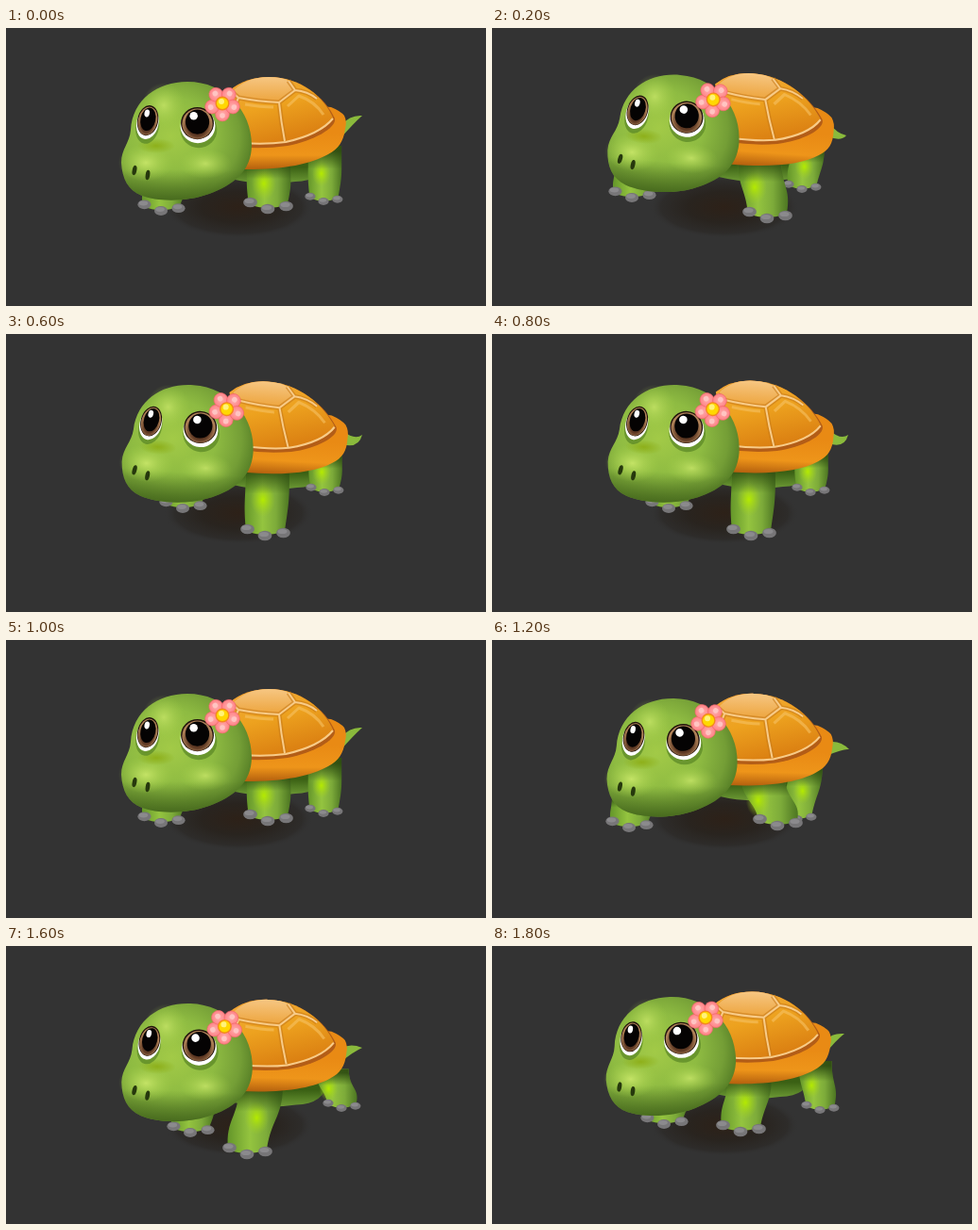
An HTML page that plays this animation: 508 px wide and 295 px high, repeating every 2000 ms.

```html
<!DOCTYPE html>
<html lang="en">
<head>
<meta charset="utf-8">
<title>Walking turtle</title>
<style>
html, body { margin: 0; height: 100%; overflow: hidden; background: #333; }
svg { display: block; width: 100vw; height: 100vh; }
</style>
</head>
<body>
<svg viewBox="0 0 508 295">
  <defs>
    <radialGradient id="ground">
      <stop offset="0" stop-color="#2d2118"/>
      <stop offset=".5" stop-color="#29241f"/>
      <stop offset=".85" stop-color="#2d2b29" stop-opacity=".9"/>
      <stop offset="1" stop-color="#333" stop-opacity="0"/>
    </radialGradient>
    <radialGradient id="skin" cx=".38" cy=".46" r=".66">
      <stop offset="0" stop-color="#a2ca47"/>
      <stop offset=".5" stop-color="#8ebb42"/>
      <stop offset=".8" stop-color="#749e36"/>
      <stop offset="1" stop-color="#527a24"/>
    </radialGradient>
    <radialGradient id="glow">
      <stop offset="0" stop-color="#cdea6c"/>
      <stop offset="1" stop-color="#a3cf48" stop-opacity="0"/>
    </radialGradient>
    <radialGradient id="spot">
      <stop offset="0" stop-color="#b4ea00"/>
      <stop offset="1" stop-color="#a0d020" stop-opacity="0"/>
    </radialGradient>
    <radialGradient id="olive">
      <stop offset="0" stop-color="#8eb01a"/>
      <stop offset="1" stop-color="#8eb01a" stop-opacity="0"/>
    </radialGradient>
    <linearGradient id="chin" x2="0" y2="1">
      <stop offset=".74" stop-color="#41631a" stop-opacity="0"/>
      <stop offset="1" stop-color="#41631a" stop-opacity=".85"/>
    </linearGradient>
    <linearGradient id="limb">
      <stop offset="0" stop-color="#64962a"/>
      <stop offset=".4" stop-color="#94c43f"/>
      <stop offset=".7" stop-color="#7dab3a"/>
      <stop offset="1" stop-color="#4c7522"/>
    </linearGradient>
    <linearGradient id="shade" x2="0" y2="1">
      <stop offset=".1" stop-color="#2c4a10" stop-opacity=".9"/>
      <stop offset=".42" stop-color="#2c4a10" stop-opacity="0"/>
    </linearGradient>
    <linearGradient id="belly" x2="0" y2="1">
      <stop offset=".3" stop-color="#3a6014"/>
      <stop offset="1" stop-color="#6d9a35"/>
    </linearGradient>
    <linearGradient id="dome" x2=".4" y2="1">
      <stop offset="0" stop-color="#f0a93f"/>
      <stop offset=".5" stop-color="#eda21f"/>
      <stop offset="1" stop-color="#db8012"/>
    </linearGradient>
    <linearGradient id="cap" x2="0" y2="1">
      <stop offset="0" stop-color="#f6c682"/>
      <stop offset="1" stop-color="#eda43c"/>
    </linearGradient>
    <linearGradient id="rim" x2="0" y2="1">
      <stop offset=".5" stop-color="#e98a14"/>
      <stop offset=".8" stop-color="#ee951a"/>
      <stop offset="1" stop-color="#b4600e"/>
    </linearGradient>
    <radialGradient id="iris" cy=".6">
      <stop offset=".6" stop-color="#5d3823"/>
      <stop offset="1" stop-color="#b08258"/>
    </radialGradient>
    <radialGradient id="petal">
      <stop offset=".2" stop-color="#ffa6a6"/>
      <stop offset="1" stop-color="#ff8287"/>
    </radialGradient>

    <g id="shell">
      <path fill="url(#rim)" d="M240 74L344 84Q354 88 358 93Q361 99 359 107C357 121 352 128 341 134C322 145 290 151 245 150Z"/>
      <path fill="#b35d17" d="M237 66Q254 52 278 52C312 52 338 74 348 96C350 106 325 120 298 125Q270 129 245 126Z"/>
      <path fill="url(#dome)" d="M237 66Q254 52 278 52C312 52 336 73 346 95C346 103 322 116 296 121Q270 125 245 122Z"/>
      <path fill="url(#cap)" d="M240 67Q255 52 278 52Q292 52 299 56L306 66L289 79Q262 78 246 74Z"/>
      <g fill="none" stroke-linejoin="round">
        <g id="seams" stroke="#c97a18" stroke-width="5" stroke-opacity=".6">
          <path d="M239 68L246 74Q266 78 289 79L306 66L299 56M289 79Q291 99 295 120M306 66Q319 67 329 75M246 74L242 83"/>
        </g>
        <path stroke="#f8cb88" stroke-width="2" d="M239 68L246 74Q266 78 289 79L306 66L299 56M289 79Q291 99 295 120M306 66Q319 67 329 75M246 74L242 83M248 122Q275 124 296 121Q332 113 346 96"/>
        <path stroke="#f7c263" stroke-width="3" opacity=".6" d="M298 83L310 72Q327 78 336 92M253 81Q270 84 283 84"/>
      </g>
    </g>

    <g id="eye">
      <ellipse cx="1" cy="5" rx="20" ry="20" fill="#5f8d28" opacity=".8"/>
      <ellipse cy="1" rx="19" ry="18.8" fill="#fff"/>
      <ellipse cx="-.5" cy="-2" rx="18" ry="17.6" fill="#20120b"/>
      <ellipse cx="-.5" cy="-1.5" rx="16.6" ry="16.6" fill="url(#iris)"/>
      <ellipse cx="-.5" cy="-3.5" rx="13" ry="13.5" fill="#050303"/>
      <ellipse cx="-4.5" cy="-10" rx="4.4" ry="4.4" fill="#fff"/>
    </g>

    <g id="head">
      <path id="face" fill="url(#skin)" d="M122 143C122 128 131 122 132 108C134 76 160 57 192 57C232 57 260 88 260 124C260 152 240 167 215 176C190 185 160 184 144 178C129 172 123 160 122 143Z"/>
      <path fill="url(#chin)" d="M122 143C122 128 131 122 132 108C134 76 160 57 192 57C232 57 260 88 260 124C260 152 240 167 215 176C190 185 160 184 144 178C129 172 123 160 122 143Z"/>
      <ellipse cx="167" cy="82" rx="23" ry="24" fill="url(#glow)" opacity=".7"/>
      <ellipse cx="148" cy="143" rx="29" ry="20" fill="url(#glow)" opacity=".85"/>
      <ellipse cx="211" cy="144" rx="28" ry="16" fill="url(#glow)" opacity=".75"/>
      <ellipse cx="159" cy="125" rx="20" ry="8" fill="url(#olive)"/>
      <use href="#eye" transform="translate(150 100) rotate(12) scale(.61 .92)"/>
      <use href="#eye" transform="translate(203 103) scale(.97)"/>
      <g fill="#26380d">
        <ellipse cx="136" cy="151" rx="2.3" ry="5.2" transform="rotate(12 136 151)"/>
        <ellipse cx="150" cy="156" rx="2.3" ry="5.2" transform="rotate(8 150 156)"/>
      </g>
      <g id="flower" transform="translate(229 80)"></g>
    </g>
  </defs>
  <rect width="508" height="295" fill="#333"/>
  <ellipse cx="246" cy="190" rx="79" ry="33" fill="url(#ground)"/>
  <g id="turtle"></g>
</svg>
<script>
const byId = id => document.getElementById(id);

byId('flower').innerHTML = [0, 1, 2, 3, 4].map(i =>
  `<circle cy="11.5" r="7.4" fill="url(#petal)" stroke="#f4656c" stroke-width=".6" transform="rotate(${i * 72})"/>
   <circle cy="13" r="2.8" fill="#ffc4c2" transform="rotate(${i * 72})"/>`).join('') +
  '<circle r="6.8" fill="#ffd800" stroke="#f38a1c" stroke-width="1.4"/><circle cx="-1" cy="-2" r="3" fill="#fff27a"/>';

// head: dx, dy, degrees; shell: dx, dy, slant; feet: middle claw; tail: bend point, tip
const stand = { head: [0, 0, 0], shell: [0, 0, 0], front: [277, 192], hind: [336, 184], far: [164, 194], tail: [364, 92, 377, 93] };
const lift = { head: [2, -7.5, 4.8], shell: [2, -2, 4], front: [291, 202], hind: [328, 171], far: [148, 180], tail: [365, 112, 375, 114] };
const glide = { head: [2, -3, 3.8], shell: [2, 0, 3.5], front: [274, 214], hind: [337, 168], far: [187, 185], tail: [369, 113, 377, 107] };
const crouch = { head: [-.3, 5, .5], shell: [1, 5.5, 1.5], front: [302, 197], hind: [323, 190], far: [145, 199], tail: [368, 106, 378, 116] };
const reach = { head: [1, 4, 2], shell: [1, 5.5, 1.5], front: [255, 221], hind: [355, 172], far: [195, 198], tail: [364, 103, 377, 108] };
const rise = { head: [-2, -3, -1.6], shell: [-1, -3, 1], front: [263, 197], hind: [347, 174], far: [182, 189], tail: [359, 92, 373, 93] };

const poses = [
  stand, lift,
  { ...glide, head: [2, -5.3, 4.3], shell: [2, -1, 3.8], front: [282, 203], far: [168, 183] },
  glide, { ...glide, shell: [2, -1, 3] },
  stand, crouch,
  { ...reach, head: [.5, 4.3, 1.3], far: [170, 200] },
  reach, rise
];

function leg(hx, hy, [fx, fy], size, hasSpot) {
  const w = 23 * size, mid = (hy + fy) / 2, ankle = fy - 5 * size;
  const shape = `M${hx - w} ${hy}C${hx - w} ${mid} ${fx - w} ${mid} ${fx - w + 3} ${ankle}` +
    `Q${fx} ${fy + 3} ${fx + w - 2} ${ankle}C${fx + w + 3} ${mid} ${hx + w} ${mid} ${hx + w} ${hy}Z`;
  const claw = (dx, dy) => {
    const x = fx + dx * size, y = fy + dy * size;
    return `<ellipse cx="${x}" cy="${y}" rx="${7.4 * size}" ry="${5.2 * size}" fill="#777678"/>
      <ellipse cx="${x - size}" cy="${y - 1.5 * size}" rx="${5 * size}" ry="${2.6 * size}" fill="#8b8a8d"/>`;
  };
  return `<path d="${shape}" fill="url(#limb)"/>` +
    (hasSpot ? `<ellipse cx="${hx - 5 * size}" cy="${mid}" rx="${13 * size}" ry="${18 * size}" fill="url(#spot)"/>` : '') +
    `<path d="${shape}" fill="url(#shade)"/>` +
    claw(-18.5, -7) + claw(19.5, -3) + claw(0, 0);
}

function draw({ head, shell, front, hind, far, tail }) {
  const [sx, sy, slant] = shell, [hx, hy, turn] = head, [cx, cy, tx, ty] = tail;
  byId('turtle').innerHTML =
    `<path fill="#8aba3c" d="M${355 + sx} ${103 + sy}Q${cx} ${cy} ${tx} ${ty}Q${cx + 4} ${cy + 9} ${354 + sx} ${117 + sy}Z"/>` +
    leg(far[0] + 4, far[1] - 36, far, .95) +
    `<path transform="translate(${sx} ${sy})" fill="url(#belly)" d="M238 140H338Q336 162 306 163Q270 168 238 160Z"/>` +
    leg(338 + (hind[0] - 337) * .4, 125 + sy, hind, .76, true) +
    leg(278 + (front[0] - 277) * .35, 138 + sy, front, 1, true) +
    `<use href="#shell" transform="translate(${300 + sx} ${100 + sy}) skewY(${slant}) skewX(${slant * 1.2}) translate(-300 -100)"/>` +
    `<use href="#head" transform="translate(${hx} ${hy}) rotate(${turn} 190 120)"/>`;
}

let shown = -1;
function tick() {
  const step = Math.floor(performance.now() / 200) % poses.length;
  if (step !== shown) draw(poses[shown = step]);
  requestAnimationFrame(tick);
}
tick();
</script>
</body>
</html>
```
